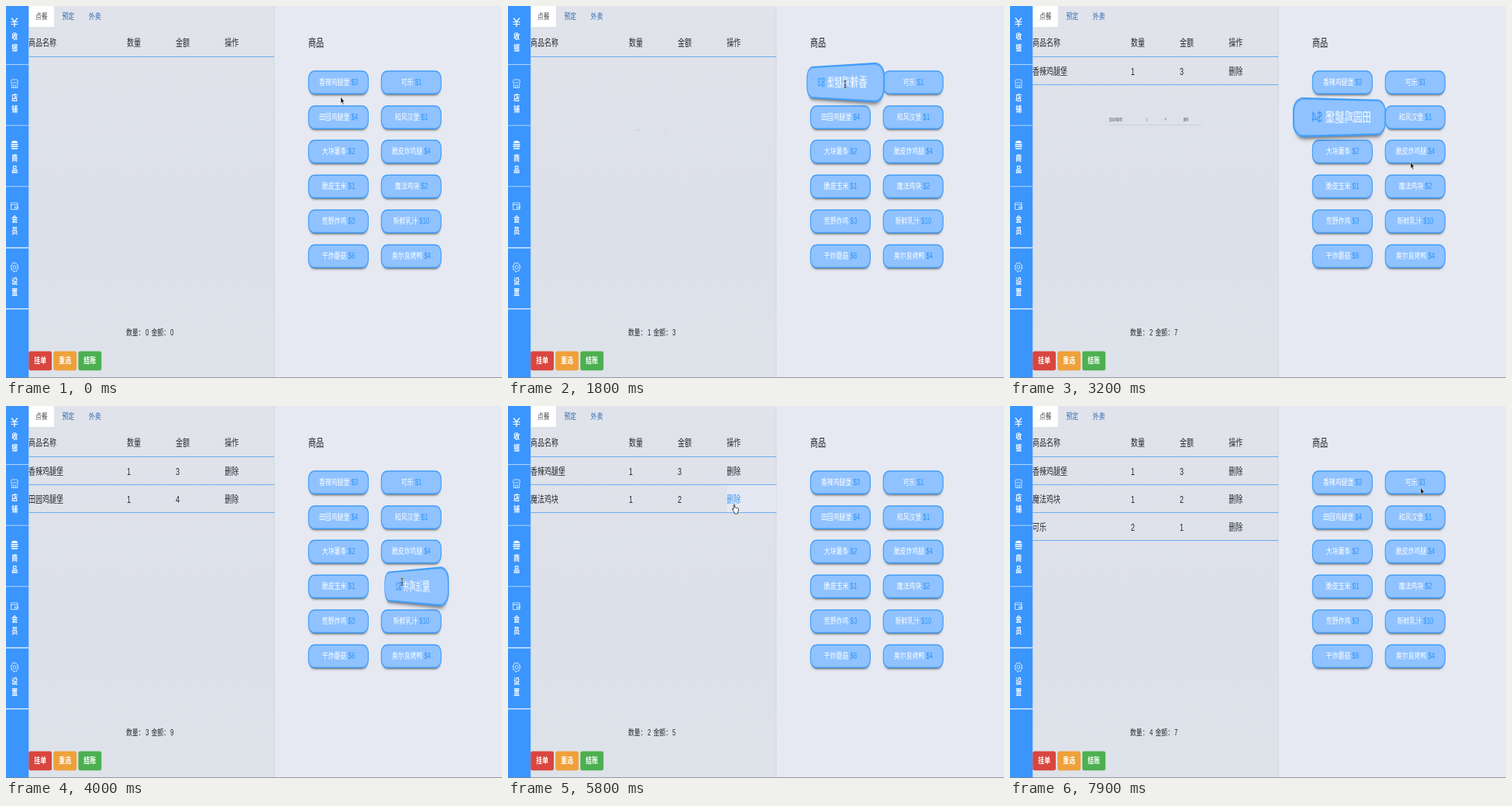
Write an HTML page that moves like this. It is 640 by 480 pixels and loops after 8000 ms.

```html
<!DOCTYPE html>
<html lang="zh-CN">
<head>
<meta charset="utf-8">
<title>点餐收银</title>
<style>
html, body { margin: 0; width: 100%; height: 100%; overflow: hidden; }
#stage { position: absolute; left: 0; top: 0; width: 640px; height: 480px; overflow: hidden; background: #e6e9f1; }
#page {
  position: absolute; left: 0; top: 0; width: 1137.78px; height: 640px;
  transform: scale(.5625, .75); transform-origin: 0 0;
  font-family: "Liberation Sans", "Noto Sans CJK SC", "Noto Sans CJK", sans-serif;
}
#page div { position: absolute; box-sizing: border-box; white-space: pre; }
.text { line-height: 1; transform: translateY(-50%); }
.text.mid { transform: translate(-50%, -50%); }
.card {
  width: 139px; height: 41px; border: 2px solid #419df7; border-radius: 14px;
  background: #8fc2ff; color: #fff; font-size: 14px; font-weight: 500; line-height: 37px; text-align: center;
  box-shadow: 0 6px 5px -5px rgba(0, 0, 0, .7);
}
.card span { color: #2f95f8; }
.row { left: 51.5px; width: 564px; height: 48px; border-bottom: 1px solid #4a9df2; }
.row .text { top: 24.5px; font-size: 16px; color: #262a30; }
.btn { border-radius: 4px; color: #fff; font-size: 14px; font-weight: 700; text-align: center; }
svg { position: absolute; left: 0; top: 0; }
</style>
</head>
<body>
<div id="stage">
  <div id="page"></div>
  <svg width="640" height="480" fill="none" stroke="#fff" stroke-width=".9">
    <path d="M7 15.5l4 4.5l4-4.5M11 20v7M6.5 20.5h9M6.5 23.5h9" stroke-width="1.2"/>
    <path d="M7.5 95h7l1.2 3.5q-1.2 2.2-2.4 0q-1.2 2.2-2.3 0q-1.2 2.2-2.4 0q-1.2 2.2-2.4 0zM7.3 100v5.5h7.4v-5.5M9.5 105.5v-3h3v3" stroke-width=".7"/>
    <path d="M6.8 177q.4-3.2 4.2-3.2t4.2 3.2z" fill="#fff" stroke="none"/>
    <path d="M6.5 178.800h9M6.500 181.200h9M7 184h8" stroke-width="1.5"/>
    <path d="M6.500 254h8.500v8.500h-8.500zM6.500 256.500h8.500M11.500 259h4v2h-4z" stroke-width=".7"/>
    <g stroke-width=".7">
      <ellipse cx="11" cy="337" rx="1.8" ry="2.3"/>
      <ellipse cx="11" cy="337" rx="4.2" ry="5.4"/>
      <ellipse cx="11" cy="337" rx="4.9" ry="6.2" stroke-dasharray="1.8 2.6"/>
    </g>
  </svg>
  <svg width="640" height="480">
    <g id="arrow"><path d="M0 0v8.500l1.500-1.500l1.200 3.200l1.200-.6l-1.200-3h1.900z" fill="#111" stroke="#fff" stroke-width=".5"/></g>
    <g id="beam" fill="none">
      <path d="M-1.800-5q1.800 0 1.800 1.500v7q0 1.500-1.800 1.500M1.800-5q-1.800 0-1.800 1.500M1.800 5q-1.800 0-1.800-1.500M-1 1h2" stroke="#fff" stroke-width="1.900"/>
      <path d="M-1.800-5q1.800 0 1.800 1.500v7q0 1.500-1.800 1.500M1.800-5q-1.800 0-1.800 1.500M1.800 5q-1.800 0-1.800-1.500M-1 1h2" stroke="#111" stroke-width=".9"/>
    </g>
    <g id="hand"><path d="M-1.800-4.500q.8-1 1.500 0v3.500q1.200-.8 1.600.4q1.200-.7 1.600.5q1.300-.4 1.500.9v2.200l-1 2v2h-4.200v-1.800l-3-4.200q.4-1.300 2 .2z" fill="#fff" stroke="#222" stroke-width=".8"/></g>
  </svg>
</div>
<script>
const KX = .5625, KY = .75, LOOP = 8000;
const page = document.getElementById('page');

function box(x, y, w, h, css = '', cls = '', parent = page) {
  const el = document.createElement('div');
  el.className = cls;
  el.style.cssText = `left:${x / KX}px;top:${y / KY}px;` +
    (w ? `width:${w / KX}px;height:${h / KY}px;` : '') + css;
  parent.appendChild(el);
  return el;
}
function text(str, x, y, size, color, cls = '', css = '') {
  const el = box(x, y, 0, 0, `font-size:${size}px;color:${color};${css}`, 'text ' + cls);
  el.textContent = str;
  return el;
}

// Static layout
box(29, 0, 317, 480, 'background:linear-gradient(#e0e3ea,#dce0e8 60%,#dee2e9)');
box(345.5, 0, .8, 480, 'background:#d2d7e0');
box(0, 0, 29.3, 480, 'background:#3a95fd');
['收银', '店铺', '商品', '会员', '设置'].forEach((label, i) => {
  const y = 78.8 * i;
  [...label].forEach((c, j) => text(c, 11.2, y + 39.2 + 14.8 * j, 14, '#fff', 'mid', 'font-weight:700'));
  box(0, y + 75, 29.3, 1, 'background:#d8e9fe');
});
box(30, 0, 32, 27, 'background:#fff');
['点餐', '预定', '外卖'].forEach((s, i) => text(s, 38 + 34.4 * i, 13, 14, i ? '#2b6cb5' : '#4a4f57'));
['商品名称', '数量', '金额', '操作'].forEach((s, i) => text(s, i ? 92.7 + 63.2 * i : 29, 48, 16, '#262a30'));
box(29, 65, 317, 1, 'background:#4a9df2');
text('商品', 390, 47.6, 18, '#1d2025', '', 'font-weight:500');
text('数量：', 155, 420.5, 14, '#262a30');
text('金额：', 187.5, 420.5, 14, '#262a30');
const count = text('0', 180, 420.5, 14, '#262a30');
const sum = text('0', 212, 420.5, 14, '#262a30');
[['挂单', '#d9453f'], ['重选', '#efa03a'], ['结账', '#4caf50']].forEach(([s, c], i) => {
  box(29.3 + 32 * i, 445.3, 29.8, 24.6, `background:${c};line-height:32px`, 'btn').textContent = s;
});
box(0, 479, 640, 1, 'background:#7c8088');

const menu = ['香辣鸡腿堡 3', '可乐 1', '田园鸡腿堡 4', '和风汉堡 1', '大块薯条 2', '脆皮炸鸡腿 4',
  '脆皮玉米 1', '魔法鸡块 2', '荒野炸鸡 3', '新鲜乳汁 10', '干炸蘑菇 6', '奥尔良烤鸭 4'];
const cards = menu.map((item, i) => {
  const [name, price] = item.split(' ');
  const el = box(390 + 94 * (i % 2), 83 + 44.9 * (i >> 1), 0, 0, '', 'card');
  el.innerHTML = `${name} <span>$${price}</span>`;
  return el;
});

// Order lines: each starts with a click on its card
const DEL = 5100;
const orders = [
  { name: '香辣鸡腿堡', price: 3, card: 0, start: 1520, slot: 0, end: LOOP },
  { name: '田园鸡腿堡', price: 4, card: 2, start: 2665, slot: 1, end: DEL },
  { name: '魔法鸡块', price: 2, card: 7, start: 3754, slot: 2, end: LOOP },
  { name: '可乐', price: 1, card: 1, start: 6685, again: 7300, slot: 2, end: LOOP }
];
const pivots = [174, 163, 168];
const hover = box(282.3, 102.3, 63.4, 35, 'background:#e3e8f2');
for (const o of orders) {
  o.el = box(29, 0, 0, 0, '', 'row');
  o.cells = [o.name, 1, o.price, '删除'].map((s, i) => {
    const el = box(i ? 63.7 + 63.2 * i : 0, 0, 0, 0, 'top:24.5px', 'text', o.el);
    el.textContent = s;
    return el;
  });
}

function bezier(x1, y1, x2, y2) {
  const at = (a, b, u) => 3 * a * u * (1 - u) ** 2 + 3 * b * u * u * (1 - u) + u ** 3;
  return x => {
    let lo = 0, hi = 1;
    for (let i = 0; i < 24; i++) {
      const m = (lo + hi) / 2;
      if (at(x1, x2, m) < x) lo = m; else hi = m;
    }
    return at(y1, y2, lo);
  };
}
const easeIn = bezier(.42, 0, 1, 1), easeOut = bezier(0, 0, .58, 1), easeInOut = bezier(.42, 0, .58, 1);
const zoomA = bezier(.55, .055, .675, .19), zoomB = bezier(.175, .885, .32, 1);

function flip(u) {
  if (u < 0 || u >= 1) return 'none';
  let z = 0, a = 0, s = 1;
  if (u < .4) {
    const p = easeOut(u / .4);
    z = 150 * p; a = -360 + 170 * p;
  } else if (u < .5) {
    z = 150; a = -190 + 20 * easeOut((u - .4) / .1);
  } else if (u < .8) {
    const p = easeIn((u - .5) / .3);
    z = 150 * (1 - p); a = -170 * (1 - p); s = 1 - .05 * p;
  } else s = .95 + .05 * easeIn((u - .8) / .2);
  return `perspective(400px) translateZ(${z}px) rotateY(${a}deg) scale(${s})`;
}

// Pointer path: time, x, y, shape
const path = [
  [0, 432, 117, 'arrow'], [900, 432, 117, 'arrow'], [1300, 435, 101, 'beam'], [2000, 435, 101, 'beam'],
  [2500, 438, 143, 'beam'], [2800, 438, 143, 'arrow'], [3200, 517, 201, 'arrow'], [3550, 511, 227, 'beam'],
  [4200, 511, 227, 'arrow'], [4900, 293, 132, 'hand'], [5950, 293, 132, 'arrow'],
  [6500, 530, 105, 'arrow'], [LOOP, 530, 105, 'arrow']
];
const shapes = ['arrow', 'beam', 'hand'].map(id => document.getElementById(id));

function pointer(t) {
  let i = 0;
  while (i < path.length - 2 && t >= path[i + 1][0]) i++;
  const [t0, x0, y0, shape] = path[i], [t1, x1, y1] = path[i + 1];
  const p = easeInOut((t - t0) / (t1 - t0));
  for (const g of shapes) {
    g.style.display = g.id === shape ? '' : 'none';
    g.setAttribute('transform', `translate(${x0 + (x1 - x0) * p} ${y0 + (y1 - y0) * p})`);
  }
  return shape === 'hand';
}

function draw(t) {
  const over = pointer(t);
  hover.style.display = over ? '' : 'none';
  let n = 0, total = 0;
  for (const o of orders) {
    const age = (t - o.start) / 1000, shown = age >= 0 && t < o.end;
    const card = cards[o.card];
    card.style.transform = flip(age);
    card.style.zIndex = age >= 0 && age < 1 ? 2 : 0;
    o.el.style.display = shown ? '' : 'none';
    if (!shown) continue;

    const qty = o.again && t >= o.again ? 2 : 1;
    n += qty;
    total += qty * o.price;
    o.cells[1].textContent = qty;

    const slot = o.slot === 2 && o.start < DEL && t >= DEL ? 1 : o.slot;
    const top = (66 + 36.1 * slot) / KY;
    let s = 1, alpha = 1;
    if (age < .6) {
      alpha = zoomA(age / .6);
      s = .1 + .375 * alpha;
    } else if (age < 1) s = .475 + .525 * zoomB((age - .6) / .4);
    o.el.style.top = top + 'px';
    o.el.style.opacity = alpha;
    o.el.style.transformOrigin = `50% ${pivots[o.slot] / KY - top}px`;
    o.el.style.transform = s < 1 ? `scale(${s})` : 'none';
    o.cells[3].style.color = over && slot === 1 ? '#3a96f8' : '#262a30';
  }
  count.textContent = n;
  sum.textContent = total;
}

const begin = performance.now();
function tick() {
  draw((performance.now() - begin) % LOOP);
  requestAnimationFrame(tick);
}
tick();
</script>
</body>
</html>
```
